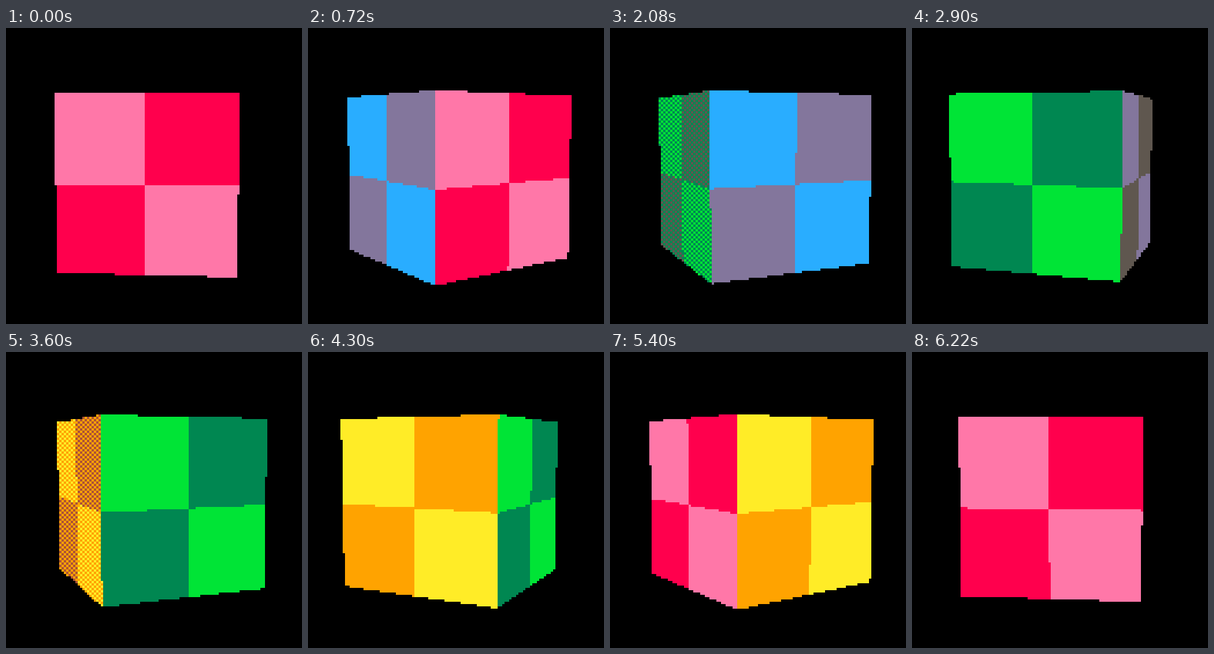
Recreate the animation shown at these times as an HTML page with a canvas. Size 512 by 512 pixels, loop 6240 ms.

```html
<!DOCTYPE html>
<html>
<head>
<meta charset="utf-8">
<style>
html, body { margin: 0; width: 100%; height: 100%; overflow: hidden; background: #000; }
canvas { display: block; width: 512px; height: 512px; image-rendering: pixelated; }
</style>
</head>
<body>
<canvas id="stage" width="128" height="128"></canvas>
<script>
const SIZE = 128, STEP = 20, STEPS = 312;
const CENTER_X = 64, CENTER_Y = 64.1;
const FOCAL = 238, DIST = 6.98, PITCH = Math.atan(0.0986);
const START = -5.15, TURN = 1.153; // degrees, degrees per step
const FULL_LIGHT = 0.438, SHADE_STEP = 0.068;

// One ramp per side, from lit to dark; the checker uses two neighbouring shades.
const RAMPS = [
  [0xff77a8, 0xff004d, 0x7e2553, 0x1d2b53, 0],
  [0x29adff, 0x83769c, 0x5f574f, 0x1d2b53, 0],
  [0x00e436, 0x008751, 0x5f574f, 0x1d2b53, 0],
  [0xffec27, 0xffa300, 0xab5236, 0x7e2553, 0]
];

const ctx = document.getElementById("stage").getContext("2d");
const image = ctx.createImageData(SIZE, SIZE);
const sinP = Math.sin(PITCH), cosP = Math.cos(PITCH);
const camY = -DIST * sinP, camZ = DIST * cosP;

function visibleSides(step) {
  return RAMPS.map((ramp, i) => {
    const angle = (START + TURN * step - 90 * i) * Math.PI / 180;
    const sin = Math.sin(angle), cos = Math.cos(angle);
    const shade = Math.max(0, Math.min(6, Math.ceil((FULL_LIGHT - cos) / SHADE_STEP)));
    return { ramp, sin, cos, shade };
  }).filter(side => camZ * side.cos > 1);
}

// Cast a ray through the pixel and read the checker where it meets a side.
function colorAt(col, row, sides) {
  const rx = col + 0.5 - CENTER_X, py = row + 0.5 - CENTER_Y;
  const ry = py * cosP + FOCAL * sinP, rz = py * sinP - FOCAL * cosP;
  for (const { ramp, sin, cos, shade } of sides) {
    const t = (1 - camZ * cos) / (rx * sin + rz * cos);
    const u = t * rx * cos - (camZ + t * rz) * sin;
    const v = camY + t * ry;
    if (t < 0 || Math.abs(u) > 1 || Math.abs(v) > 1) continue;
    const dither = shade % 2 && (col + row) % 2;
    const checker = (u < 0) === (v < 0) ? 0 : 1;
    return ramp[Math.min(4, checker + (shade >> 1) + dither)];
  }
  return 0;
}

function draw(step) {
  const sides = visibleSides(step);
  for (let row = 0, p = 0; row < SIZE; row++) {
    for (let col = 0; col < SIZE; col++) {
      const color = colorAt(col, row, sides);
      image.data[p++] = color >> 16;
      image.data[p++] = color >> 8 & 255;
      image.data[p++] = color & 255;
      image.data[p++] = 255;
    }
  }
  ctx.putImageData(image, 0, 0);
}

function tick() {
  draw(Math.floor(performance.now() / STEP) % STEPS);
  requestAnimationFrame(tick);
}
tick();
</script>
</body>
</html>
```
